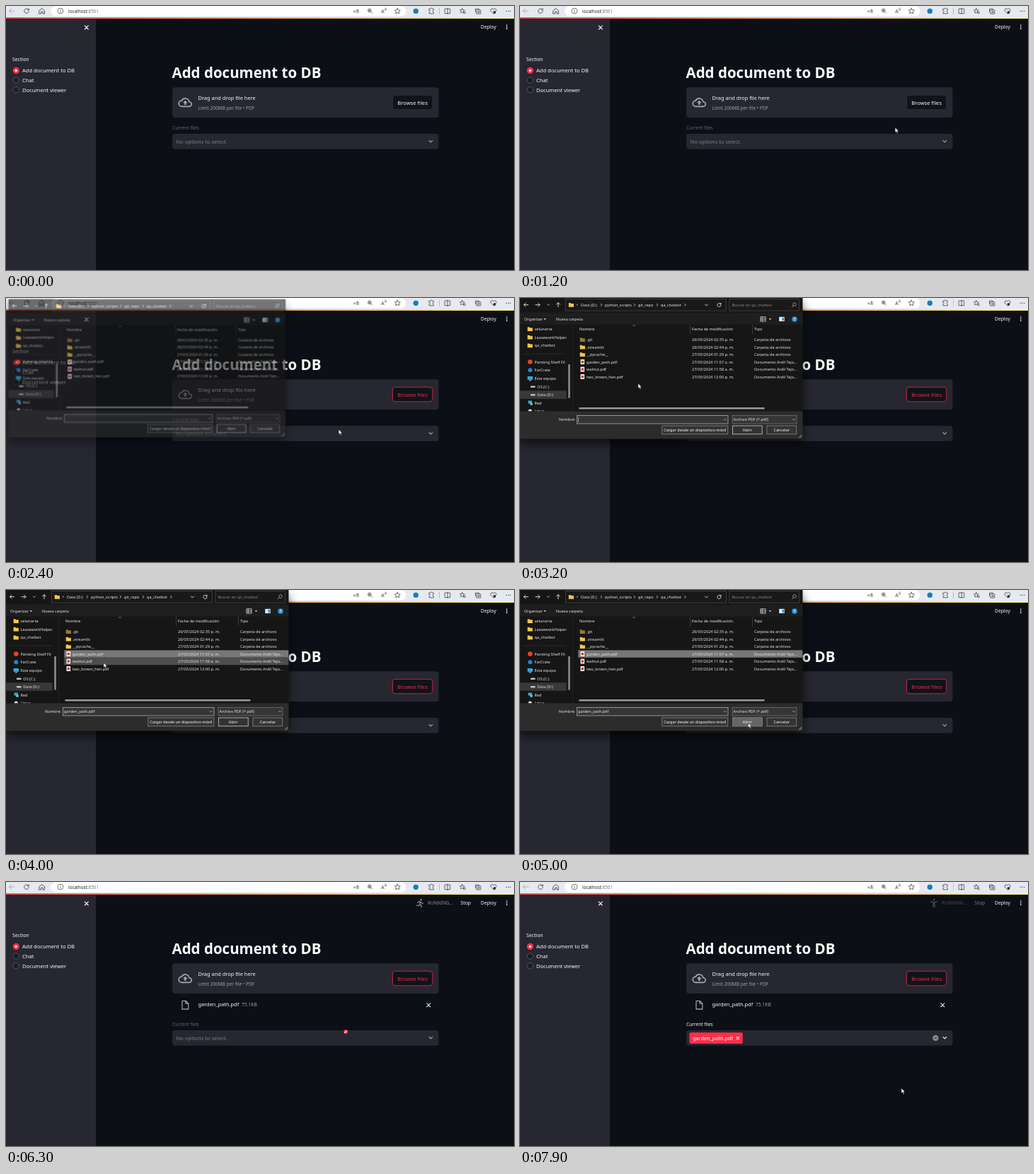
Animation of 718 by 374 pixels, one loop 8000 ms. Source, as an HTML page:

```html
<!DOCTYPE html>
<html lang="en">
<head>
<meta charset="utf-8">
<title>Add document to DB</title>
<style>
  html, body { margin: 0; width: 100%; height: 100%; overflow: hidden; background: #0c0f16; }
  svg { display: block; width: 100vw; height: 100vh; }
  text { font-family: "Noto Sans", "Open Sans", sans-serif; white-space: pre; }
  #dialog { transform-origin: 180px 85px; }
</style>
</head>
<body>
<svg id="stage" viewBox="0 0 718 374"></svg>
<script>
const LOOP = 8000;
const RED = '#ff2f4b', PANEL = '#262730', WHITE = '#fafafa';

// Markup helpers
const text = (x, y, size, fill, str, more = '') =>
  `<text x="${x}" y="${y}" font-size="${size}" fill="${fill}" ${more}>${str}</text>`;
const rect = (x, y, w, h, fill, more = '') =>
  `<rect x="${x}" y="${y}" width="${w}" height="${h}" fill="${fill}" ${more}/>`;
const circle = (x, y, r, fill, more = '') =>
  `<circle cx="${x}" cy="${y}" r="${r}" fill="${fill}" ${more}/>`;
const line = (d, color, width = 0.9, more = '') =>
  `<path d="${d}" fill="none" stroke="${color}" stroke-width="${width}" stroke-linecap="round" stroke-linejoin="round" ${more}/>`;
const group = (id, body, more = '') => `<g id="${id}" ${more}>${body}</g>`;
const cross = (x, y, r, color, width) =>
  line(`M${x - r} ${y - r}l${2 * r} ${2 * r}m0 ${-2 * r}l${-2 * r} ${2 * r}`, color, width);
const down = (x, y, r, color, width = 0.9) =>
  line(`M${x - r} ${y - r / 2}l${r} ${r}l${r} ${-r}`, color, width);
const right = (x, y) => line(`M${x - 0.8} ${y - 1.6}l1.6 1.6l-1.6 1.6`, '#ddd', 0.8);
const star = (x, y, r) => {
  const points = Array.from({ length: 10 }, (_, i) => {
    const a = i * Math.PI / 5 - Math.PI / 2, d = i % 2 ? r * 0.48 : r;
    return `${(x + d * Math.cos(a)).toFixed(1)} ${(y + d * Math.sin(a)).toFixed(1)}`;
  });
  return line(`M${points.join('L')}Z`, '#444', 0.8);
};
const reload = (x, y, r, color) =>
  line(`M${x + r * 0.8} ${y - r * 0.6}A${r} ${r} 0 1 0 ${x + r} ${y + 0.4}M${x + r} ${y - r}v${r * 0.6}h${-r * 0.6}`, color);
const lens = (x, y, color) => circle(x, y, 2.3, 'none', `stroke="${color}" stroke-width=".8"`);

function browserBar() {
  const ink = '#444';
  return rect(0, 0, 718, 16, '#e6eaf0') +
    `<path d="M70 0h489a6 7 0 0 1 0 14.5h-488a7 7 0 0 1-1-14.5z" fill="#fff"/>` +
    line('M12 7H4.5m3-3.2L4.5 7l3 3.2', '#a5a8ad') + reload(29, 7, 3.3, ink) +
    line('M47 6.5L50.7 3.4L54.4 6.5V11H52V8H49.5V11H47Z', ink) +
    circle(77, 7, 3.9, 'none', `stroke="#555" stroke-width=".8"`) + line('M77 6.5v2.4M77 5v.1', '#555', 0.8) +
    text(88, 9.5, 6.35, '#222', 'localhost<tspan fill="#777">:8501</tspan>') +
    text(490.8, 9.2, 5.6, ink, 'aあ', 'style="font-family:\'Noto Sans\',\'Noto Sans CJK JP\',sans-serif"') +
    lens(513.8, 6.3, ink) + line('M515.7 8.2l2 2M512.6 6.3h2.4m-1.2-1.2v2.4', ink, 0.7) +
    text(530.3, 10, 7, ink, 'A') + line('M535.5 3.4q1.3 1.3 0 2.6m1.3-3.4q2 2.1 0 4.2', ink, 0.6) +
    star(553.3, 7.3, 4.2) + circle(579.3, 7.2, 3.7, '#1a7fb4') +
    line('M598 4.2h2a1.3 1.3 0 0 1 2.6 0h1.8v2a1.3 1.3 0 0 0 0 2.6v2H598V8.8a1.3 1.3 0 0 0 0-2.6z', ink, 0.8) +
    line('M612.5 3v8.5', '#aaa', 0.7) +
    line('M620.5 4h7.2v6.6h-7.2zM624.1 3v8.5', ink, 0.8) + star(644.8, 7, 3.6) +
    line('M647 8.3h2.5m-2.5 2h2.5', ink, 0.8) +
    line('M663.5 8.5V4h5v1M665.3 5.6h5.5v5.4h-5.5zM668 7v2.7m-1.3-1.3h2.7', ink, 0.8) +
    line('M689 10.8l-3.8-3.8a2 2 0 0 1 3.8-2.2a2 2 0 0 1 3.8 2.2z', ink, 0.8) + circle(690.5, 9, 1.9, '#333') +
    [707.3, 710, 712.7].map(x => circle(x, 7.2, 0.7, ink)).join('') +
    rect(0, 16, 718, 1.9, 'url(#stripe)');
}

function sidebar() {
  const items = ['Add document to DB', 'Chat', 'Document viewer'];
  return rect(0, 18, 127, 356, PANEL) + cross(113.8, 30.5, 2.5, '#eee', 1.1) +
    text(9, 78, 6.85, WHITE, 'Section') +
    items.map((label, i) => {
      const y = 91.4 + i * 13.7;
      const dot = i ? circle(14.3, y, 4.2, '#1c1d26', 'stroke="#5a5b63" stroke-width=".9"')
                    : circle(14.3, y, 4.6, RED) + circle(14.3, y, 1.6, '#fff');
      return dot + text(23, y + 2.8, 7.55, WHITE, label);
    }).join('');
}

function uploader() {
  const button = (color, border) =>
    rect(546.5, 126.3, 56.3, 20.5, '#11131b', `rx="3.6" stroke="${border}" stroke-width=".9"`) +
    text(574.7, 139.5, 7.6, color, 'Browse files', 'text-anchor="middle"');
  return text(234.5, 101.6, 20.5, WHITE, 'Add document to DB', 'font-weight="700"') +
    rect(235, 115.3, 376.5, 42.8, PANEL, 'rx="4"') +
    `<g transform="translate(243.5 126.8) scale(.82)">` +
    line('M18.6 10.9A6.6 6.6 0 0 0 6 8.9A5 5 0 0 0 6 19H19A4 4 0 0 0 18.6 10.9Z', '#a9aab0', 2) +
    '<path d="M12 8.6l-4 4h2.6v3.4h2.8v-3.4H16z" fill="#a9aab0"/></g>' +
    text(271.5, 133.4, 7.45, WHITE, 'Drag and drop file here') +
    text(271.5, 147.2, 6.55, '#a0a1a8', 'Limit 200MB per file • PDF') +
    group('idle', button(WHITE, '#30313a')) + group('hot', button('#f02a45', '#dc2640'));
}

function fileRow() {
  return line('M249 168.5h5.2l3.6 3.6v8h-8.8zM254 168.5v3.8h3.8', '#b5b6bb', 1.1) +
    text(271.5, 176.3, 7.4, WHITE, 'garden_path.pdf') +
    text(333, 176.3, 6.7, '#a0a1a8', '75.1KB') + cross(597.3, 174.4, 2.5, '#eee', 1.1);
}

function picker() {
  const empty = group('empty', text(235, 175.3, 6.55, '#666870', 'Current files') +
    group('hint', text(240.5, 194.7, 7.53, '#7c7d84', 'No options to select.') + down(600.3, 191.8, 2.3, '#a5a6ab', 1.2)));
  const filled = group('filled', text(235, 175.3, 6.55, WHITE, 'Current files') +
    rect(239.5, 184.3, 75.3, 15.7, RED, 'rx="2"') + text(244, 194.7, 7.3, '#fff', 'garden_path.pdf') +
    cross(307.9, 192.2, 1.6, '#fff', 1.1) + circle(587.4, 192, 4, '#8f9096') +
    cross(587.4, 192, 1.4, PANEL, 0.9) + down(600.3, 191.8, 2.3, WHITE, 1.2));
  return rect(235, 181, 376.5, 21.7, PANEL, 'rx="4"') + empty + filled;
}

function status() {
  const ink = '#8d8e94';
  const pose = (id, head, d) => group(id, circle(...head, 1.3, ink) + line(d, ink, 1.3));
  return pose('run', [586.6, 25.2], 'M581.6 29.3l2-1.6l2.4 .3l-1.2 3.3l2.2 1.8v2.8M584.6 32l-1 1.7l-3.2-.5M586 28.2l1.4 1.7l2.2 .3') +
    pose('ride', [587, 25.2], 'M588.6 29h-2l-1.6-1.6l-2 2.3l2.2 1.4v2.6M581.8 35a1.9 1.9 0 1 1 .1 0M588.4 35a1.9 1.9 0 1 1 .1 0') +
    pose('stand', [585, 25], 'M580.4 27.8q4.6 1.2 9.2 0M584 28.6v6.8M586 28.6v6.8M584 31.5h2') +
    text(596, 32, 6.5, ink, 'RUNNING...') + text(642.5, 32, 6.8, WHITE, 'Stop');
}

function fileDialog() {
  const size = 5.55, ink = '#e8e8e8';
  const label = (x, y, str, fill = ink, more = '') => text(x, y + 2, size, fill, str, more);
  const folder = (x, y, fill = '#f5c64a') =>
    `<path d="M${x} ${y - 2.8}h2.8l.9 1h3.5v4.8h-7.2z" fill="${fill}"/>`;
  const page = (x, y) => rect(x, y - 3.4, 5.6, 6.8, '#f2f2f2', 'rx=".5"') + rect(x + 1.2, y - 1.6, 3.2, 3.2, '#d92b2b');
  const drive = (x, y) => rect(x, y - 1, 6.5, 2.6, '#b9c0c6', 'rx=".5"');
  const button = (x, w, str, border, fill = '#333') =>
    rect(x, 181, w, 11.8, fill, `stroke="${border}" stroke-width=".8"`) +
    label(x + w / 2, 187, str, '#fff', 'text-anchor="middle"');

  const files = [
    ['.git', '26/03/2024 02:35 p. m.'], ['.streamlit', '26/03/2024 02:44 p. m.'],
    ['__pycache__', '27/03/2024 01:29 p. m.'], ['garden_path.pdf', '27/03/2024 11:57 a. m.'],
    ['walnut.pdf', '27/03/2024 11:58 a. m.'], ['two_brown_hen.pdf', '27/03/2024 12:00 p. m.']];
  const rowY = i => 59 + i * 10.5;
  const rows = files.map(([name, date], i) => {
    const y = rowY(i), isPdf = i > 2;
    return (isPdf ? page(85.5, y) : folder(84.7, y, i ? undefined : '#94793a')) +
      label(94, y, name) + label(243, y, date) +
      label(331, y, isPdf ? 'Documento Ardil Tejo...' : 'Carpeta de archivos');
  }).join('');
  const band = (id, row, fill, border = 'none') =>
    group(id, rect(82.3, rowY(row) - 5.2, 317, 10.4, fill, `stroke="${border}" stroke-width=".6"`));

  const tree = folder(10.6, 44) + label(20.5, 44, 'velunorte') +
    folder(10.6, 55.5) + label(20.5, 55.5, 'LeaseworkHelper') +
    folder(10.6, 67.3) + label(20.5, 67.3, 'qa_chatbot') + line('M4 79h60', '#3a3a3a', 0.6) +
    rect(0, 131.2, 65.5, 11.6, '#383838') +
    circle(14.3, 90.5, 3.3, '#e5432d') + label(20.5, 90.5, 'Painting Shelf Fil') +
    circle(14.3, 102.2, 3, '#1f86d6') + label(20.5, 102.2, 'FarCrate') +
    rect(10.6, 111, 7.4, 4.8, '#35a7e0') + rect(12.6, 116.4, 3.4, 0.9, '#cdd') + label(20.5, 113.8, 'Este equipo') +
    drive(15, 125.5) + label(24.3, 125.5, 'OS (C:)') + drive(15, 137) + label(24.3, 137, 'Data (D:)') +
    rect(11.5, 145.5, 5.5, 4, '#35a7e0') + circle(16, 150, 2, '#5fc2b0') + label(20.5, 149, 'Red') +
    circle(14.3, 160, 2.6, '#ddd') + label(20.5, 160.3, 'Linux');

  return rect(0, 0, 399.5, 199.5, '#191919', 'filter="url(#shadow)"') +
    rect(0, 20.5, 399.5, 17, '#1e1e1e') +
    line('M11.5 9.6h-6m2.4-2.5L5.5 9.6l2.4 2.5M22 9.6h6m-2.4-2.5L28 9.6l-2.4 2.5M54 12.6v-6m-2.5 2.5L54 6.6l2.5 2.5', ink) +
    down(40, 9.6, 1.6, '#bbb') +
    rect(64.5, 1.5, 227, 16.6, '#191919', 'stroke="#4c4c4c" stroke-width=".7"') +
    rect(296, 1.5, 98.5, 16.6, '#191919', 'stroke="#4c4c4c" stroke-width=".7"') +
    folder(68.8, 9.8) + label(79.5, 9.4, '«', '#bbb') + label(86, 9.6, 'Data (D:)') + right(115, 9.8) +
    label(120, 9.6, 'python_scripts') + right(162, 9.8) + label(167, 9.6, 'git_repo') + right(194, 9.8) +
    label(199, 9.6, 'qa_chatbot') + right(233.5, 9.8) + down(263.5, 10, 2, ink) + reload(281.5, 9.8, 2.6, ink) +
    label(299.5, 9.8, 'Buscar en qa_chatbot', '#888') + lens(388, 9, '#aaa') + line('M386.3 10.7l-2 2', '#aaa', 0.8) +
    label(6, 30, 'Organizar') + '<path d="M33.5 29h3.4l-1.7 2zM351.8 29h3.4l-1.7 2z" fill="#ddd"/>' +
    label(51, 30, 'Nueva carpeta') +
    rect(340, 26.7, 7, 6.4, 'none', 'stroke="#ddd" stroke-width=".7"') + line('M340 28.8h7m-7 2.1h7M342.4 27v6', '#ddd', 0.7) +
    rect(366.3, 26.8, 7.4, 6.2, '#eee') + rect(370.4, 27.8, 2.6, 4.4, '#2f8fd8') +
    circle(388, 30, 3.8, '#2b93dd') + label(388, 30.1, '?', '#fff', 'text-anchor="middle" font-weight="700"') +
    `<g clip-path="url(#treeClip)">${tree}</g>` + rect(68.2, 94, 2.6, 47.5, '#8d8d8d') +
    line('M74.6 38v122', '#2c2c2c', 0.7) + line('M240.5 38v13M328.5 38v13', '#555', 0.6) +
    line('M159.3 39.5l1.7-1.3l1.7 1.3', '#aaa', 0.6) +
    label(84, 44.2, 'Nombre') + label(243, 44.2, 'Fecha de modificación') + label(331, 44.2, 'Tipo') +
    band('overFirst', 3, '#4d4d4d') + band('picked', 3, '#777') + band('pickedDim', 3, '#303030', '#444') +
    band('overSecond', 4, '#4d4d4d') + band('overThird', 5, '#4d4d4d') + rows +
    rect(83.5, 155, 262, 2.5, '#9a9a9a') +
    rect(0, 160.5, 399.5, 39, '#2c2c2c') + label(78, 172, 'Nombre:', ink, 'text-anchor="end"') +
    rect(80.5, 166.4, 213.5, 11.6, '#363636', 'stroke="#aaa" stroke-width=".8"') + down(289.7, 172.3, 1.5, '#ccc', 0.7) +
    group('caret', line('M82.6 169v6.4', '#eee', 0.6)) +
    group('marked', rect(81.8, 168, 41, 8.3, '#1c88f0')) + group('fileName', label(82, 172, 'garden_path.pdf')) +
    rect(300, 166.4, 91, 11.6, '#363636', 'stroke="#777" stroke-width=".7"') +
    label(301.6, 172, 'Archivo PDF (*.pdf)') + down(387, 172.3, 1.5, '#ccc', 0.7) +
    button(200.8, 93, 'Cargar desde un dispositivo móvil', '#888') + button(300.5, 41.7, 'Abrir', '#ccc') +
    group('openOver', button(300.5, 41.7, 'Abrir', '#707070', '#666')) + button(349, 41.7, 'Cancelar', '#888') +
    line('M394 198l4-4m-2 4l2-2', '#aaa', 0.8);
}

const pointer =
  group('arrow', '<path d="M0 0V7.2L1.7 5.7L2.9 8.4L4.2 7.8L3 5.2H5.2Z" fill="#fff" stroke="#111" stroke-width=".6"/>') +
  group('blocked', circle(4, 4.2, 2.6, '#fff', 'stroke="#d4122f" stroke-width="1.1"') + line('M2.4 2.6l3.2 3.2', '#d4122f', 1.1));

document.getElementById('stage').innerHTML = `
  <defs>
    <linearGradient id="stripe"><stop stop-color="#ff4b4b"/><stop offset="1" stop-color="#fffd80"/></linearGradient>
    <clipPath id="treeClip"><path d="M0 38h66v122.5H0z"/></clipPath>
    <filter id="shadow" x="-10%" y="-10%" width="120%" height="130%">
      <feDropShadow dx="0" dy="7" stdDeviation="7" flood-opacity=".6"/></filter>
  </defs>` +
  rect(0, 0, 718, 374, '#0c0f16') + browserBar() + sidebar() + uploader() +
  group('fileRow', fileRow()) + group('picker', picker()) + group('status', status()) +
  text(671, 32, 6.7, WHITE, 'Deploy') + [27, 29.6, 32.2].map(y => circle(707.8, y, 0.85, WHITE)).join('') +
  group('dialog', fileDialog()) + group('cursor', pointer);

// Each step is [ms, value]; values hold until the next step unless eased.
function play(id, prop, steps, easing = 'step-end') {
  const frames = [...steps, [LOOP, steps.at(-1)[1]]]
    .map(([ms, value]) => ({ offset: ms / LOOP, [prop]: value, easing }));
  document.getElementById(id).animate(frames, { duration: LOOP, iterations: Infinity });
}
const show = (id, from, to = LOOP) =>
  play(id, 'opacity', [[0, from ? 0 : 1], ...(from ? [[from, 1]] : []), ...(to < LOOP ? [[to, 0]] : [])]);

const path = [
  [0, 75, 315], [500, 75, 315], [900, 360, 245], [1300, 586, 148], [1400, 575, 139], [1700, 575, 139],
  [2200, 536, 181], [2600, 405, 191], [2900, 265, 160], [3200, 167, 121], [3500, 125, 99], [3600, 124, 92],
  [3750, 124, 92], [4000, 137.5, 102.5], [4200, 215, 160], [4400, 300, 204], [4600, 322.5, 188],
  [5550, 322.5, 188], [5900, 390, 234], [6300, 476, 208], [6400, 488, 214], [6700, 520, 262], [7000, 539, 292]];
play('cursor', 'transform', path.map(([ms, x, y]) => [ms, `translate(${x}px, ${y}px)`]), 'linear');
show('cursor', 500);
play('arrow', 'opacity', [[0, 1], [6000, 0], [6500, 1]]);
show('blocked', 6000, 6500);

show('idle', 0, 1400);
show('hot', 1400);

play('dialog', 'opacity', [[0, 0], [2400, 0.6], [2500, 1], [5400, 0.65], [5500, 0]]);
play('dialog', 'transform', [[0, 'scale(.96)'], [2400, 'scale(.98)'], [2500, 'none'], [5400, 'scale(.98)']]);
show('overFirst', 3600, 3800);
show('picked', 3800, 5200);
show('pickedDim', 5200);
play('overSecond', 'opacity', [[0, 0], [3500, 1], [3600, 0], [3900, 1], [4050, 0]]);
show('overThird', 4050, 4100);
show('caret', 2600, 3800);
show('fileName', 3800);
show('marked', 5200);
show('openOver', 4600);

show('fileRow', 5500);
play('picker', 'transform', [[0, 'translateY(0px)'], [5500, 'translateY(29px)']]);
play('hint', 'opacity', [[0, 1], [6500, 1], [7000, 0.65]], 'linear');
show('empty', 0, 7600);
show('filled', 7600);
play('status', 'opacity', [[0, 0], [5500, 1], [7600, 0.85], [7700, 0.7], [7800, 0.6], [7900, 0.48]]);

['run', 'ride', 'stand'].forEach((id, pose) => {
  const steps = [[0, 0]];
  for (let i = 0; i < 12; i++) steps.push([5600 + i * 200, i % 3 === pose ? 1 : 0]);
  play(id, 'opacity', steps);
});
</script>
</body>
</html>
```
